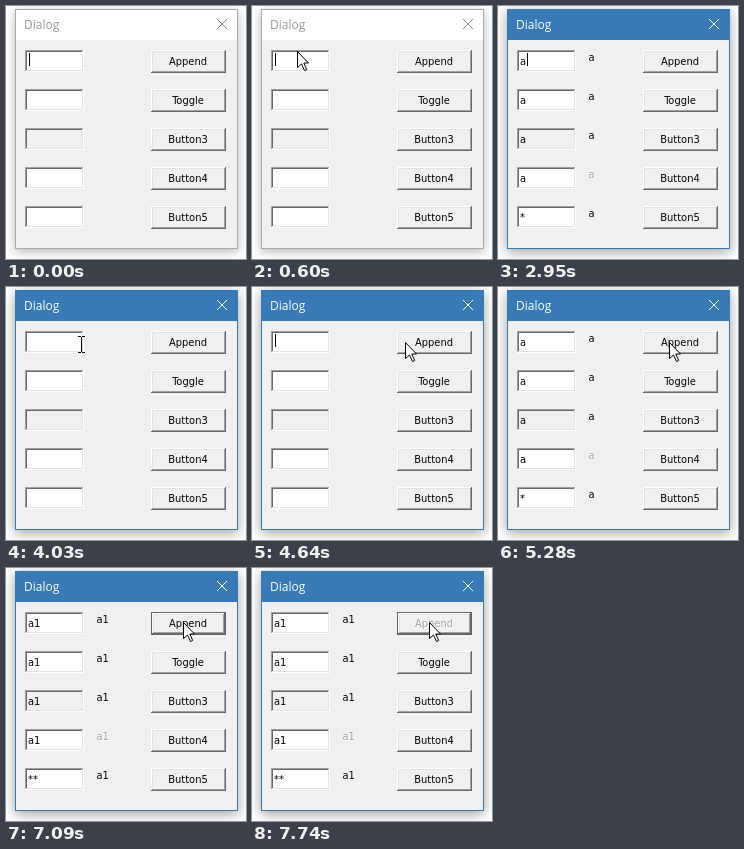
Write an HTML page with a canvas that moves like this. It is 240 px wide and 253 px high and loops after 8 s.

```html
<!DOCTYPE html>
<html lang="en">
<head>
<meta charset="utf-8">
<title>Dialog</title>
<style>
html, body { margin: 0; width: 100%; height: 100%; overflow: hidden; background: #fff; }
canvas { display: block; width: 240px; height: 253px; }
</style>
</head>
<body>
<canvas id="stage"></canvas>
<script>
const W = 240, H = 253, LOOP = 8000;
const canvas = document.getElementById('stage');
const dpr = window.devicePixelRatio || 1;
canvas.width = Math.round(W * dpr);
canvas.height = Math.round(H * dpr);
const ctx = canvas.getContext('2d');

const UI_FONT = 'condensed 11px "DejaVu Sans Condensed", "DejaVu Sans", sans-serif';
const TITLE_FONT = '12px "Open Sans", sans-serif';
const FACE = '#f0f0f0', LIGHT = '#e3e3e3', SHADE = '#a0a0a0', DARK = '#696969';
const BUTTONS = ['Append', 'Toggle', 'Button3', 'Button4', 'Button5'];
const rowY = i => 44 + 39 * i;

// Each track is a list of [time, value]; values hold until the next entry.
const TEXT = [[0, ''], [1550, 'a'], [1760, 'ab'], [2190, 'abc'], [2520, 'ab'],
  [2950, 'a'], [3280, ''], [4750, 'a'], [7090, 'a1']];
const CARET = [[0, 1], [100, 0], [600, 1], [1140, 0], [1550, 1], [3820, 0],
  [4350, 1], [5280, 0], [5820, 1], [6350, 0]];
const BUTTON = [[0, 'up'], [6460, 'down'], [6550, 'busy'], [7090, 'focus'],
  [7630, 'down'], [7740, 'busy']];
const POINTER = [[0, null],
  [100, ['arrow', 185, 240]], [200, ['arrow', 154, 188]], [310, ['arrow', 112, 124]],
  [410, ['arrow', 76, 78]], [510, ['arrow', 54, 53]], [600, ['arrow', 45, 45]],
  [1140, ['beam', 48, 49]], [1250, ['beam', 58, 53]], [1350, ['beam', 68, 57]],
  [1450, ['beam', 73, 59]], [1760, null],
  [3930, ['beam', 73, 59]], [4030, ['beam', 75, 57]], [4130, ['arrow', 84, 53]],
  [4240, ['arrow', 99, 50]], [4340, ['arrow', 117, 50]], [4450, ['arrow', 133, 52]],
  [4550, ['arrow', 145, 54]], [4640, ['arrow', 153, 55]], [4750, ['arrow', 158, 55]],
  [4850, ['arrow', 162, 55]], [4960, ['arrow', 165, 55]], [5070, ['arrow', 168, 55]],
  [5280, ['arrow', 171, 55]], [5380, ['arrow', 175, 54]], [5490, ['arrow', 177, 54]]];

function at(track, t) {
  let value = track[0][1];
  for (const [time, v] of track) if (time <= t) value = v;
  return value;
}

function rect(x, y, w, h, color) {
  ctx.fillStyle = color;
  ctx.fillRect(x, y, w, h);
}

// Top and left edges in one colour, bottom and right in another.
function bevel(x, y, w, h, topLeft, bottomRight) {
  rect(x, y, w, 1, topLeft);
  rect(x, y, 1, h, topLeft);
  rect(x, y + h - 1, w, 1, bottomRight);
  rect(x + w - 1, y, 1, h, bottomRight);
}

function text(str, x, y, color = '#000', align = 'left', font = UI_FONT) {
  ctx.font = font;
  ctx.textAlign = align;
  ctx.fillStyle = color;
  ctx.fillText(str, x, y);
}

function disabledText(str, x, y, align) {
  text(str, x + 1, y + 1, '#fff', align);
  text(str, x, y, SHADE, align);
}

function drawWindow(active) {
  rect(0, 0, W, H, '#fff');
  ctx.save();
  ctx.shadowColor = active ? 'rgba(0,0,0,.38)' : 'rgba(0,0,0,.28)';
  ctx.shadowBlur = (active ? 12 : 10) * dpr;
  ctx.shadowOffsetY = 3 * dpr;
  rect(9, 3, 223, 240, active ? '#357ab5' : '#a8a8a8');
  ctx.restore();
  rect(10, 4, 221, 30, active ? '#377ab5' : '#fff');
  rect(10, 34, 221, 208, FACE);
  text('Dialog', 18, 23, active ? '#fff' : '#999', 'left', TITLE_FONT);
  ctx.strokeStyle = active ? '#fff' : '#888';
  ctx.lineWidth = 1;
  ctx.beginPath();
  ctx.moveTo(211, 13); ctx.lineTo(221, 23);
  ctx.moveTo(221, 13); ctx.lineTo(211, 23);
  ctx.stroke();
}

function drawEdit(i, value) {
  const y = rowY(i);
  rect(19, y, 59, 22, i === 2 ? FACE : '#fff');
  bevel(19, y, 59, 22, SHADE, '#fff');
  bevel(20, y + 1, 57, 20, DARK, LIGHT);
  text(i === 4 ? '*'.repeat(value.length) : value, 22, y + 15);
}

function drawLabel(i, value) {
  (i === 3 ? disabledText : text)(value, 90.5, rowY(i) + 11);
}

function drawButton(i, state) {
  let x = 145, y = rowY(i), w = 75, h = 23;
  rect(x, y, w, h, FACE);
  if (state !== 'up') {
    bevel(x, y, w, h, '#646464', '#646464');
    x++; y++; w -= 2; h -= 2;
  }
  const down = state === 'down' ? 1 : 0;
  if (down) {
    bevel(x, y, w, h, SHADE, SHADE);
  } else {
    bevel(x, y, w, h, '#fff', DARK);
    bevel(x + 1, y + 1, w - 2, h - 2, LIGHT, SHADE);
  }
  const draw = state === 'busy' ? disabledText : text;
  const args = [BUTTONS[i], 182 + down, rowY(i) + 15 + down];
  if (state === 'busy') draw(...args, 'center');
  else draw(...args, '#000', 'center');
}

function drawArrow(x, y) {
  const outline = [[0, 0], [0, 16], [4, 12.5], [7, 19], [9.2, 18], [6.3, 11.5], [11, 11.5]];
  ctx.beginPath();
  for (const [dx, dy] of outline) ctx.lineTo(x + dx + .5, y + dy + .5);
  ctx.closePath();
  ctx.fillStyle = '#fff';
  ctx.fill();
  ctx.strokeStyle = '#000';
  ctx.lineWidth = 1;
  ctx.stroke();
}

function drawBeam(x, y) {
  rect(x, y - 7, 1, 15, '#000');
  for (const dy of [-8, 8]) {
    rect(x - 3, y + dy, 3, 1, '#000');
    rect(x + 1, y + dy, 3, 1, '#000');
  }
}

function draw(t) {
  ctx.setTransform(dpr, 0, 0, dpr, 0, 0);
  const value = at(TEXT, t);
  drawWindow(t >= 930);
  for (let i = 0; i < 5; i++) {
    drawEdit(i, value);
    drawLabel(i, value);
    drawButton(i, i ? 'up' : at(BUTTON, t));
  }
  if (at(CARET, t)) rect(23 + 6 * value.length, 47, 1, 13, '#000');
  const pointer = at(POINTER, t);
  if (pointer) {
    const [kind, x, y] = pointer;
    (kind === 'arrow' ? drawArrow : drawBeam)(x, y);
  }
}

const start = performance.now();
function tick() {
  draw((performance.now() - start) % LOOP);
  requestAnimationFrame(tick);
}
tick();
</script>
</body>
</html>
```
